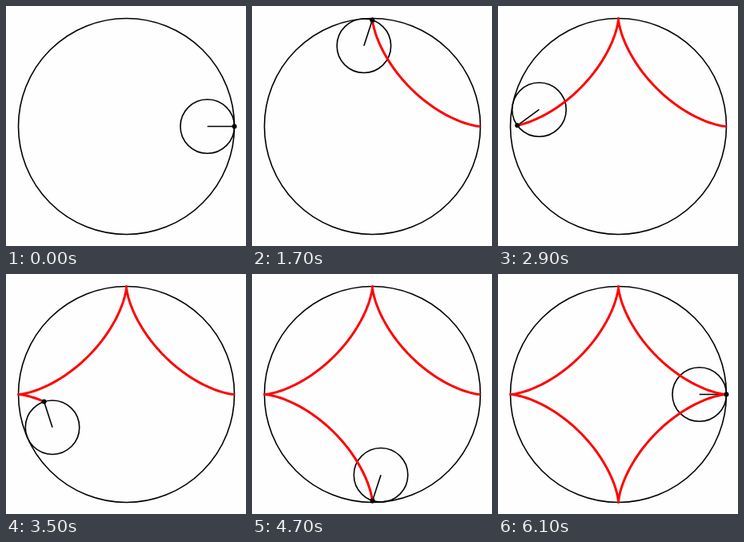
These frames come from a looping animation (300x300 px, 6800 ms). An HTML page with a canvas:

```html
<!DOCTYPE html>
<html>
<head>
<meta charset="utf-8">
<title>Astroid</title>
<style>
  html, body { margin: 0; width: 100%; height: 100%; overflow: hidden; background: #fefefe; }
  canvas { display: block; }
</style>
</head>
<body>
<canvas id="stage" width="300" height="300"></canvas>
<script>
const ctx = document.getElementById('stage').getContext('2d');
const LOOP = 6800, HOLD = 100, STEP = 100, STEPS = 60;
const CENTER = 150.5, R = 135, r = R / 4;

const astroid = a => [CENTER + R * Math.cos(a) ** 3, CENTER - R * Math.sin(a) ** 3];

function circle(x, y, radius) {
  ctx.beginPath();
  ctx.arc(x, y, radius, 0, 2 * Math.PI);
}

function draw(time) {
  // The wheel advances in discrete steps, then rests after a full turn.
  const step = Math.max(0, Math.min(STEPS, Math.floor((time % LOOP - HOLD) / STEP)));
  const angle = step / STEPS * 2 * Math.PI;
  const hubX = CENTER + (R - r) * Math.cos(angle);
  const hubY = CENTER - (R - r) * Math.sin(angle);
  const pen = astroid(angle);

  ctx.fillStyle = '#fefefe';
  ctx.fillRect(0, 0, 300, 300);

  ctx.strokeStyle = '#000';
  ctx.lineWidth = 1.6;
  circle(CENTER, CENTER, R);
  ctx.stroke();
  circle(hubX, hubY, r);
  ctx.stroke();
  ctx.beginPath();
  ctx.moveTo(hubX, hubY);
  ctx.lineTo(...pen);
  ctx.stroke();

  if (step > 0) {
    ctx.strokeStyle = '#f00';
    ctx.lineWidth = 3;
    ctx.lineJoin = 'round';
    ctx.beginPath();
    for (let i = 0; i <= step * 4; i++) ctx.lineTo(...astroid(angle * i / (step * 4)));
    ctx.stroke();
  }

  ctx.fillStyle = '#000';
  circle(...pen, 3);
  ctx.fill();
}

const start = performance.now();
function tick() {
  draw(performance.now() - start);
  requestAnimationFrame(tick);
}
tick();
</script>
</body>
</html>
```
